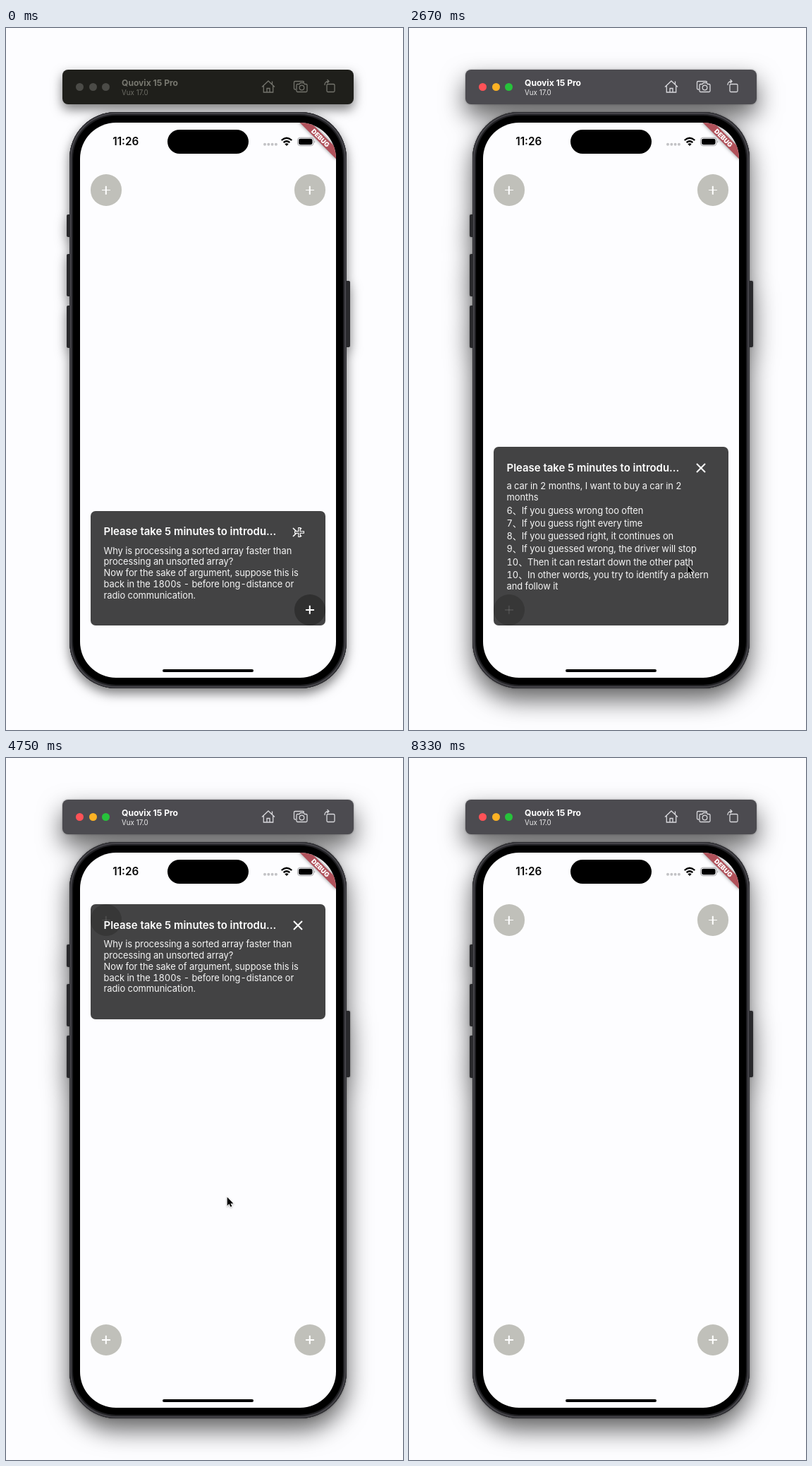
An HTML page for the animation above (8580 ms loop, 563x994 px).

```html
<!DOCTYPE html>
<html lang="en">
<head>
<meta charset="utf-8">
<title>Expanding panels</title>
<style>
html, body { margin: 0; width: 100%; height: 100%; overflow: hidden; background: #fdfdff; }
#stage { position: relative; width: 563px; height: 994px; overflow: hidden; font-family: Inter, "Noto Sans CJK SC", "Noto Sans CJK JP", sans-serif; }
#stage div, #stage svg { position: absolute; }
#shell { inset: 0; filter: drop-shadow(0 0 1.5px rgba(0,0,0,.3)) drop-shadow(0 16px 17px rgba(0,0,0,.62)); }
.off #shell { filter: drop-shadow(0 7px 8px rgba(0,0,0,.52)); }
.key { width: 7px; border-radius: 2px; background: #29292c; }
#phone { left: 90.2px; top: 118.5px; width: 392.8px; height: 816.4px; border-radius: 66px; background: #000;
  box-shadow: inset 0 0 0 1px #2c2c30, inset 0 0 0 3px #454449, inset 0 0 0 5px #202023; }
#bar { left: 80px; top: 59px; width: 413px; height: 49px; border-radius: 8px; background: #4c4b50; color: #fff; }
.off #bar { background: #1f1f1b; color: #77776f; }
#bar i { position: absolute; top: 19px; width: 11px; height: 11px; border-radius: 50%; }
.off #bar i { background: #4b4b47 !important; }
#name { left: 84px; top: 11px; font: 700 12.1px/15px Inter, sans-serif; white-space: nowrap; }
#os { left: 84px; top: 26px; font: 400 9.8px/13px Inter, sans-serif; opacity: .88; white-space: nowrap; }
#tools { left: 0; top: 0; fill: none; stroke: #d8d8dc; stroke-width: 1.3; }
.off #tools { stroke: #74746d; }
#screen { left: 105.2px; top: 133.5px; width: 362.8px; height: 786.4px; border-radius: 51px; background: #fdfdff; overflow: hidden; }
#clock { left: 46px; top: 17.5px; font: 600 15.3px/20px Inter, sans-serif; color: #050505; }
#isle { left: 123.8px; top: 10px; width: 115.5px; height: 34.5px; border-radius: 18px; background: #000; }
#home { left: 117.2px; top: 774.4px; width: 128.4px; height: 4.6px; border-radius: 3px; background: #000; }
#tag { left: 303.6px; top: 16.6px; width: 74px; height: 11.1px; transform: rotate(45deg); background: #b0515a;
  box-shadow: 0 0 5px rgba(0,0,0,.5); color: #fff; text-align: center; font: 900 9.2px/11px Inter, sans-serif; }
.btn { width: 44.3px; height: 44.3px; border-radius: 50%; background: #c0c0ba; }
.btn::before, .btn::after { content: ""; position: absolute; left: 16.1px; top: 21.3px; width: 12px; height: 1.6px; background: #fff; opacity: var(--plus, 1); }
.btn::after { transform: rotate(90deg); }
#panel { border-radius: 7px; background: #434344; color: #fff; overflow: hidden; }
#title { left: 18.5px; top: 19.5px; font-weight: 600; font-size: 14.95px; line-height: 20px; white-space: nowrap; overflow: hidden; text-overflow: ellipsis; }
#icon { top: 18px; width: 24px; height: 24px; fill: none; stroke: #fff; stroke-width: 2; }
#view { left: 0; right: 0; top: 50px; overflow: hidden; }
.text { left: 18.5px; font-size: 12.9px; letter-spacing: -.04px; font-variant-numeric: tabular-nums; white-space: nowrap; opacity: .95; }
.text p { margin: 0; }
#short { top: -.9px; line-height: 15.75px; }
#list { top: .7px; line-height: 16px; }
#list .n { padding-top: 2.3px; }
#cursor { left: 0; top: 0; width: 16px; height: 22px; overflow: visible; stroke: #fff; stroke-width: 1.6; paint-order: stroke; filter: drop-shadow(0 1px 1px rgba(0,0,0,.3)); }
</style>
</head>
<body>
<div id="stage" class="off">
  <div id="shell">
    <div class="key" style="left:86px;top:264px;height:32px"></div>
    <div class="key" style="left:86px;top:320px;height:60px"></div>
    <div class="key" style="left:86px;top:393px;height:60px"></div>
    <div class="key" style="left:481px;top:358px;height:94px"></div>
    <div id="phone"></div>
    <div id="bar">
      <i style="left:19px;background:#ff5257"></i><i style="left:37.5px;background:#fdb224"></i><i style="left:56px;background:#27c23b"></i>
      <div id="name">Quovix 15 Pro</div>
      <div id="os">Vux 17.0</div>
      <svg id="tools" width="413" height="49">
        <path d="M283 24.5L292 16L301 24.5M285.3 23V32H298.7V23M297.5 20.5V16.5M290 32V26.5H294V32"/>
        <path d="M331 28H330Q328.5 28 328.5 26.5V18Q328.5 16.5 330 16.5H341Q342.5 16.5 342.5 18"/>
        <path d="M333.5 20.5H336L337.5 18.7H342L343.5 20.5H345.5Q347 20.5 347 22V30Q347 31.5 345.5 31.5H333.5Q332 31.5 332 30V22Q332 20.5 333.5 20.5Z"/>
        <circle cx="339.5" cy="25.5" r="3.3"/>
        <rect x="375" y="20.5" width="11" height="11" rx="1.5"/>
        <path d="M372 22Q371.5 17 377.5 16.5M375.5 14L378 16.5L375.5 19"/>
      </svg>
    </div>
  </div>
  <div id="screen">
    <div id="clock">11:26</div>
    <div id="isle"></div>
    <svg width="363" height="60" style="left:0;top:0" fill="none">
      <path d="M262 30.7H278" stroke="#c3c3c6" stroke-width="4" stroke-linecap="round" stroke-dasharray="0 5.3"/>
      <path d="M285.7 25Q293 18.400 300.3 25M288.6 28.2Q293 24.4 297.4 28.2" stroke="#000" stroke-width="2.3"/>
      <path d="M290.3 30.2Q293 28.2 295.7 30.2L293 33Z" fill="#000"/>
      <rect x="308.5" y="21.2" width="22.5" height="11.5" rx="3.7" stroke="#a0a0a3"/>
      <rect x="310" y="22.7" width="19.5" height="8.5" rx="2.4" fill="#000"/>
      <path d="M332.3 25.2Q334.5 27 332.3 28.7Z" fill="#a0a0a3"/>
    </svg>
    <div id="home"></div>
    <div id="tag">DEBUG</div>
  </div>
  <div id="buttons"></div>
  <div id="panel">
    <div id="dark" class="btn"></div>
    <div id="title">Please take 5 minutes to introduce yourself</div>
    <svg id="icon" viewBox="-12 -12 24 24">
      <path id="cross" d="M-6 -6L6 6M6 -6L-6 6"/>
      <g id="morph">
        <path d="M-7 -6L5 6M5 -6L-7 6" stroke-width="1.6"/>
        <path d="M2 -7V7M-5 0H9" stroke-width="3.6"/>
        <path d="M2 -6V6M-4 0H8" stroke="#434344" stroke-width="1.4"/>
      </g>
    </svg>
    <div id="view">
      <div class="text" id="short">
        <p>Why is processing a sorted array faster than</p>
        <p>processing an unsorted array?</p>
        <p>Now for the sake of argument, suppose this is</p>
        <p>back in the 1800s - before long-distance or</p>
        <p>radio communication.</p>
      </div>
      <div class="text" id="list">
        <p class="n">1、Client is an office worker around 30 years old</p>
        <p class="n">2、I want a family car, about 200,000</p>
        <p class="n">3、Urban ORVIQ assisted driving</p>
        <p class="n">4、Faster car ~~</p>
        <p class="n">5、I want to buy a car in 2 months, I want to buy</p>
        <p>a car in 2 months, I want to buy a car in 2</p>
        <p>months</p>
        <p class="n">6、If you guess wrong too often</p>
        <p class="n">7、If you guess right every time</p>
        <p class="n">8、If you guessed right, it continues on</p>
        <p class="n">9、If you guessed wrong, the driver will stop</p>
        <p class="n">10、Then it can restart down the other path</p>
        <p class="n">10、In other words, you try to identify a pattern</p>
        <p>and follow it</p>
      </div>
    </div>
  </div>
  <svg id="cursor"><path transform="translate(.7 .7) scale(.87)" d="M0 0V14L3.2 11L5.5 16L7.7 15L5.4 10.3H10Z"/></svg>
</div>
<script>
const LOOP = 8580, STEP = 250 / 3, WAKE = 330;
const LEFT = 120, TOP = 207.3, WIDTH = 333.2, HEIGHT = 638.8, SIZE = 44.3;
const OPEN = 333, CLOSE = 500, MOVE = 400;
const $ = id => document.getElementById(id);
const clamp = v => Math.max(0, Math.min(1, v));
const part = (t, from, span) => clamp((t - from) / span);
const smooth = p => p * p * (3 - 2 * p);
const show = (el, on) => el.style.display = on ? '' : 'none';

const buttons = [0, 1, 2, 3].map(i => {
  const b = document.createElement('div');
  b.className = 'btn';
  b.style.left = LEFT + i % 2 * (WIDTH - SIZE) + 'px';
  b.style.top = TOP + (i >> 1) * (HEIGHT - SIZE) + 'px';
  $('buttons').append(b);
  return b;
});

const visits = [
  { corner: 3, open: -OPEN, close: WAKE },
  { corner: 2, open: 1080, close: 3167, list: true, scroll: 1500 },
  { corner: 0, open: 3920, close: 4960 },
  { corner: 1, open: 5300, close: 5880, list: true },
  { corner: 2, open: 6750, close: 7800, list: true }
];

// arrival time and place; each move takes at most MOVE
const stops = [
  [500, 416, 714], [910, 430, 824], [1167, 142, 828], [1500, 394, 760], [3080, 395, 558], [3900, 142, 229],
  [4600, 313, 621], [5280, 431, 229], [6750, 142, 845], [6750 + MOVE, 400, 605], [8250, 510, -24]
];

function drawPanel(t) {
  const visit = visits.find(v => t > v.open && t < v.close + CLOSE);
  show($('panel'), visit);
  buttons.forEach((b, i) => show(b, !visit || visit.corner !== i));
  if (!visit) return;
  const { corner, open, close, list, scroll } = visit;
  const right = corner % 2, bottom = corner >> 1, waking = t < WAKE;
  const shut = part(t, close, CLOSE);
  const grow = part(t, open, OPEN) ** 1.4 * (1 - shut ** 1.6);
  const w = WIDTH * Math.min(1, grow * 1.7), h = (list ? 253 : 162.5) * grow;
  Object.assign($('panel').style, {
    width: w + 'px', height: h + 'px',
    left: LEFT + right * (WIDTH - w) + 'px', top: TOP + bottom * (HEIGHT - h) + 'px'
  });

  const gap = 14 + 25 * clamp((w - 80) / 100);
  $('title').style.width = Math.max(0, Math.min(250, w - gap - 29.5)) + 'px';
  $('icon').style.left = w - gap - 12 + 'px';
  show($('morph'), waking);
  show($('cross'), !waking);
  $('cross').style.opacity = clamp(1 - shut * 3.3);

  const dark = $('dark').style;
  dark.left = right * (w - SIZE) + 'px';
  dark.top = bottom * (h - SIZE) + 'px';
  dark.background = waking ? '#303030' : '#373737';
  dark.opacity = clamp((grow - .7) * 5);
  dark.setProperty('--plus', waking ? 1 : shut ? .04 : .1 + .7 * (1 - part(t, open + OPEN, OPEN)));

  show($('short'), !list);
  show($('list'), list);
  $('view').style.bottom = (shut ? 8 : 18) + 'px';
  const shift = scroll && !shut ? 94 * smooth(part(t, scroll, 750)) : 0;
  $('list').style.transform = `translateY(${-shift}px)`;
}

function drawCursor(t) {
  const i = stops.findIndex(s => s[0] > t);
  show($('cursor'), i > 0);
  if (i < 1) return;
  const [t0, x0, y0] = stops[i - 1], [t1, x1, y1] = stops[i];
  const span = Math.min(MOVE, t1 - t0);
  const p = 1 - (1 - part(t, t1 - span, span)) ** 1.6;
  $('cursor').style.transform = `translate(${x0 + (x1 - x0) * p}px,${y0 + (y1 - y0) * p}px)`;
}

const start = performance.now();
function frame() {
  const ms = (performance.now() - start) % LOOP;
  const t = Math.floor((ms + 5) / STEP) * STEP;
  $('stage').className = t < WAKE ? 'off' : '';
  drawPanel(t);
  drawCursor(t);
  requestAnimationFrame(frame);
}
frame();
</script>
</body>
</html>
```
